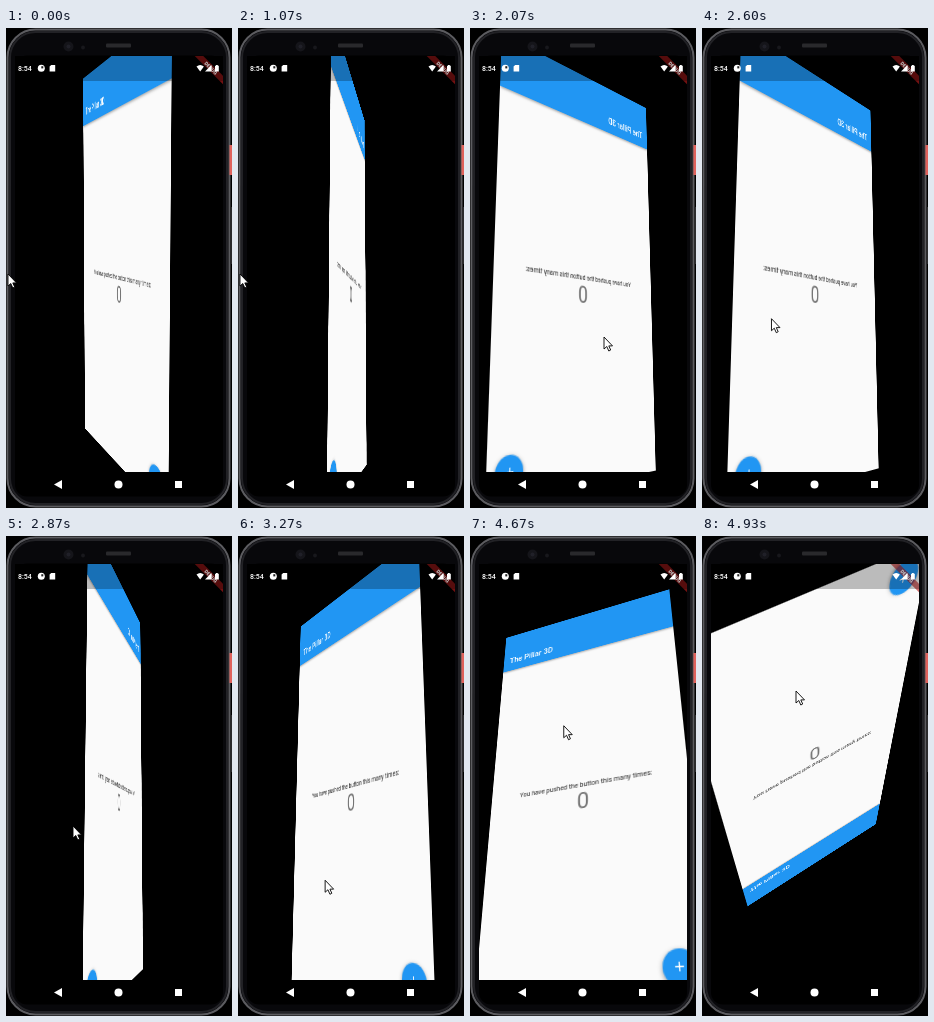
Animation of 226x480 px, one loop 4990 ms. Source, as an HTML page:

```html
<!DOCTYPE html>
<html lang="en">
<head>
<meta charset="utf-8">
<title>Tilting app</title>
<style>
html, body { margin: 0; width: 100%; height: 100%; overflow: hidden; background: #000; }
body { position: relative; font-family: Roboto, sans-serif; }
svg { position: absolute; left: 0; top: 0; }
#screen { position: absolute; left: 9px; top: 27.5px; width: 208px; height: 416.5px; overflow: hidden; background: #000; }
#app { position: absolute; left: -.5px; top: 0; width: 208px; height: 416px; overflow: hidden; background: #fafafa; outline: 1px solid transparent; }
#app > * { position: absolute; }
#bar { left: 0; top: 0; width: 100%; height: 53.5px; background: #2196f3; box-shadow: 0 1px 3px #0006; }
#title { left: 8px; top: 33.5px; font: 500 10.1px/12px Roboto, sans-serif; color: #fff; }
#label, #count { width: 100%; text-align: center; white-space: nowrap; }
#label { top: 217.5px; font-size: 7.1px; line-height: 8px; color: #000d; }
#count { top: 225.5px; font-size: 23px; line-height: 27px; color: #0000008a; }
#fab { left: 171.5px; top: 379.5px; width: 28.5px; height: 28.5px; border-radius: 50%; background: #2196f3; box-shadow: 0 1.5px 4px #0006; }
#fab::before, #fab::after { content: ""; position: absolute; left: 10.75px; top: 13.75px; width: 7px; height: 1px; background: #fff; }
#fab::after { transform: rotate(90deg); }
#shade { position: absolute; left: 0; top: 0; width: 100%; height: 25px; background: #00000040; }
#banner { position: absolute; left: 176px; top: 9.2px; width: 40px; height: 6px; background: #b71c1ca0; color: #fff;
  font-size: 5px; font-weight: 900; line-height: 6px; text-align: center; transform: rotate(45deg); }
</style>
</head>
<body>
<svg width="226" height="480" fill="none">
  <rect x="1.5" y="1.5" width="222" height="477" rx="28" fill="#08080b" stroke="#5c5c60" stroke-width="2"/>
  <rect x="4" y="4" width="217" height="472" rx="25.5" stroke="#222226" stroke-width="2"/>
  <rect x="9" y="27.5" width="208" height="441" rx="12" fill="#000"/>
  <rect x="100" y="15.5" width="25" height="4" rx="1" fill="#29292c"/>
  <circle cx="62.5" cy="18.5" r="5" fill="#15151a"/>
  <circle cx="62.5" cy="18.5" r="2" fill="#202028"/>
  <circle cx="77" cy="19.5" r="2" fill="#18181c"/>
  <rect x="223.5" y="117" width="2.5" height="30" fill="#e0625c"/>
  <rect x="224" y="179" width="2" height="57" fill="#2b2b2d"/>
</svg>
<div id="screen">
  <div id="app">
    <div id="bar"></div>
    <div id="title">The Pillar 3D</div>
    <div id="label">You have pushed the button this many times:</div>
    <div id="count">0</div>
    <div id="fab"></div>
  </div>
  <div id="banner">DEBUG</div>
  <div id="shade"></div>
</div>
<svg width="226" height="480" fill="#fff">
  <text x="12" y="43" font-size="7" font-weight="500">8:54</text>
  <circle cx="35.3" cy="40.3" r="3.5"/>
  <path d="M35.3 38.2h2v2.2h-2z" fill="#222"/>
  <path d="M45.2 37h4v6.6h-5.6v-5z"/>
  <path d="M190.5 38.6q3.7-3 7.4 0l-3.7 4.8z"/>
  <path d="M205.5 37v6.5h-6.5z"/>
  <path d="M209 37.7h1v-.8h1.8v.8h1v5.8h-3.8z"/>
  <path d="M56 452v9l-8-4.5z"/>
  <circle cx="112.5" cy="456.5" r="4"/>
  <rect x="169" y="453" width="7" height="7"/>
  <path id="cursor" d="M0 0V12L2.8 9.5L4.8 14L6.7 13L4.8 8.9H8.5Z" stroke="#000" stroke-width=".9"/>
</svg>
<script>
const LOOP = 4990;
const app = document.getElementById("app");
const cursor = document.getElementById("cursor");

const linear = u => u;
const easeOut = u => 1 - (1 - u) ** 3;

// Runs the moves [start tick, ticks, a, b] in turn and rests between them.
const glide = (from, moves, ease) => n =>
  moves.reduce((pos, [start, ticks, ...to]) => {
    const u = ease(Math.min(Math.max((n - start) / ticks, 0), 1));
    return pos.map((p, i) => p + (to[i] - p) * u);
  }, from);

// pitch and yaw in radians
const tilt = glide([.075, 1.16], [
  [15, 1, -.2, 1.74], [16, 7, -.2, 2.4],
  [38, 5, -.17, 1.834], [43, 3, -.2, 1],
  [48, 7, -.465, .43], [56, 5, -.465, .39],
  [70, 3, -2.195, .61]
], linear);

const pointer = glide([2, 246], [
  [16, 13, 134, 309], [31, 12, 67, 290], [43, 12, 90, 352],
  [56, 5, 92, 433], [66, 8, 94, 155]
], easeOut);

function draw(now) {
  // 15 ticks per second, on a 10 ms grid
  const n = Math.floor((Math.floor(now % LOOP / 10) * 10 + 4) * .015);
  const [pitch, yaw] = tilt(n);
  app.style.transform = `perspective(506px) rotateX(${-pitch}rad) rotateY(${-yaw}rad)`;
  cursor.setAttribute("transform", `translate(${pointer(n)})`);
}

const start = performance.now();
function loop() {
  draw(performance.now() - start);
  requestAnimationFrame(loop);
}
loop();
</script>
</body>
</html>
```
